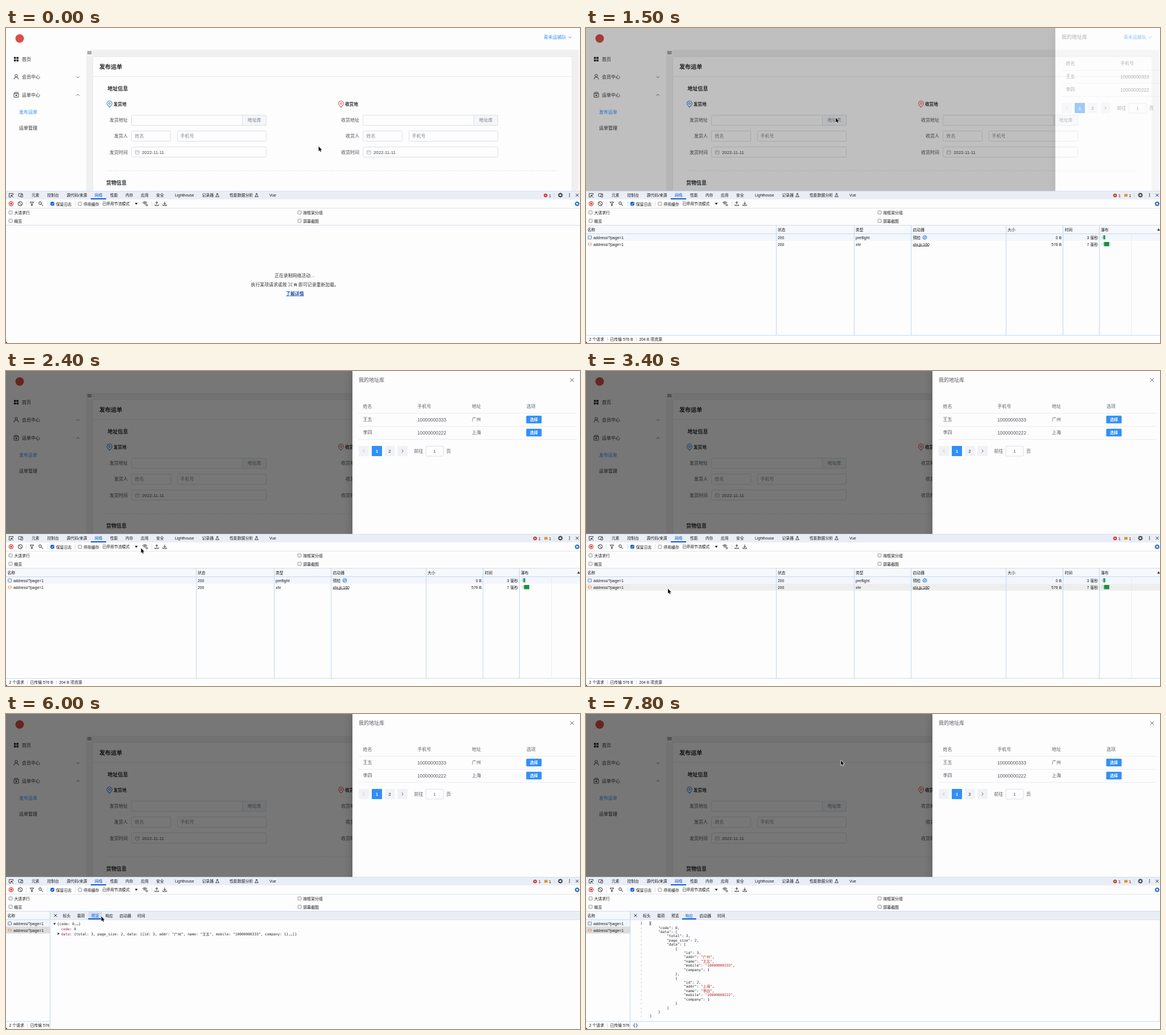
Animation of 1009 by 555 pixels, one loop 8 s. Source, as an HTML page with a canvas:

```html
<!DOCTYPE html>
<html lang="zh-CN">
<head>
<meta charset="utf-8">
<title>发布运单</title>
<style>
html, body { margin: 0; width: 100%; height: 100%; overflow: hidden; background: #fdfdfd; }
canvas { display: block; width: 1009px; height: 555px; }
</style>
</head>
<body>
<canvas id="stage" width="1009" height="555"></canvas>
<script>
const W = 1009, H = 555, PAGE_H = 287, LOOP = 8000, STEP = 100;
const SANS = '"Liberation Sans", "Noto Sans CJK SC", "Noto Sans CJK", sans-serif';
const MONO = '"DejaVu Sans Mono", "Noto Sans CJK SC", "Noto Sans CJK", monospace';
const PAPER = '#fdfdfd', INK = '#2b2c2e', DEV = '#1a1a1a', BLUE = '#0b57d0', LINK = '#2f8fff', GRID = '#bfd6f8';
const SMALL = 6.85, CODE = 6.23;
const PHONES = ['10000000333', '10000000222'];

const stage = document.getElementById('stage').getContext('2d');
const layer = Object.assign(document.createElement('canvas'), { width: W, height: H }).getContext('2d');
let g = stage;

// ---- drawing helpers ----
function text(s, x, y, size, color = INK, opt = {}) {
  g.font = `${opt.weight || 400} ${size}px ${opt.font || SANS}`;
  g.textAlign = opt.align || 'left';
  g.fillStyle = color;
  g.fillText(s, x, y + size * 0.37);
}
const dev = (s, x, y, color = DEV, opt) => text(s, x, y, SMALL, color, opt);
const bold = (s, x, y, size, color = INK) => text(s, x, y, size, color, { weight: 700 });

function rect(x, y, w, h, color) {
  g.fillStyle = color;
  g.fillRect(x, y, w, h);
}
function box(x, y, w, h, r, fill, stroke, width = 1) {
  g.beginPath();
  g.roundRect(x, y, w, h, r);
  if (fill) { g.fillStyle = fill; g.fill(); }
  if (stroke) { g.strokeStyle = stroke; g.lineWidth = width; g.stroke(); }
}
function line(points, color, width = 1, dash = []) {
  g.beginPath();
  for (let i = 0; i < points.length; i += 2) g.lineTo(points[i], points[i + 1]);
  g.setLineDash(dash);
  g.strokeStyle = color;
  g.lineWidth = width;
  g.stroke();
  g.setLineDash([]);
}
function shape(points, color) {
  g.beginPath();
  for (let i = 0; i < points.length; i += 2) g.lineTo(points[i], points[i + 1]);
  g.fillStyle = color;
  g.fill();
}
function circle(x, y, r, fill, stroke, width = 1, a = 0, b = Math.PI * 2) {
  g.beginPath();
  g.arc(x, y, r, a, b);
  if (fill) { g.fillStyle = fill; g.fill(); }
  if (stroke) { g.strokeStyle = stroke; g.lineWidth = width; g.stroke(); }
}
const chevron = (x, y, w, h, color) => line([x - w, y - h, x, y + h, x + w, y - h], color, 0.9);
const sideways = (x, y, d, color) => line([x - d, y - 2.6, x + d, y, x - d, y + 2.6], color, 0.9);
function cross(x, y, d, color, width) {
  line([x - d, y - d, x + d, y + d], color, width);
  line([x + d, y - d, x - d, y + d], color, width);
}

// ---- web page ----
function pin(x, y, color) {
  g.beginPath();
  g.arc(x, y - 1, 4.4, Math.PI * 0.85, Math.PI * 0.15);
  g.lineTo(x, y + 5.6);
  g.closePath();
  g.strokeStyle = color;
  g.lineWidth = 1.1;
  g.stroke();
  circle(x, y - 1, 1.6, null, color, 1);
}

function addressForm(dx, kind, color) {
  const edge = '#dcdfe6', hint = '#85888e', x = 220.5 + dx;
  pin(182 + dx, 134, color);
  bold(kind + '货地', 189 + dx, 134.5, 7.6);
  [['货地址', 162.5], ['货人', 190.5], ['货时间', 219]].forEach(([s, y]) =>
    text(kind + s, 214 + dx, y, 8, '#4d5055', { align: 'right' }));
  box(x, 153.5, 237, 18, 2, PAPER, edge);
  box(415.5 + dx, 153.5, 42, 18, [0, 2, 2, 0], '#f4f6f9', edge);
  text('地址库', 436.5 + dx, 162.5, 8, '#7b7e84', { align: 'center' });
  box(x, 181.5, 69, 18, 2, PAPER, edge);
  box(301.5 + dx, 181.5, 156, 18, 2, PAPER, edge);
  text('姓名', 226.5 + dx, 190.5, 8, hint);
  text('手机号', 306.5 + dx, 190.5, 8, hint);
  box(x, 209.5, 237, 18, 2, PAPER, edge);
  box(227.5 + dx, 216, 6.5, 6, 0.5, null, '#a3a6ad', 0.8);
  line([227.5 + dx, 218.3, 234 + dx, 218.3], '#a3a6ad', 0.8);
  text('2022-11-11', 239 + dx, 219, 7.8, '#434548');
}

function drawPage() {
  rect(0, 0, W, PAGE_H, PAPER);
  circle(24, 18.5, 7.5, '#dc4d45');
  text('青禾运输队', 945, 16.5, 8, LINK);
  chevron(991.5, 16.5, 2.5, 1.3, LINK);

  rect(141, 38.5, 866, 249, '#f0f0f0');
  rect(142, 39, 10, 11, '#f6f6f6');
  for (const y of [41.5, 43.5, 45.5]) line([143, y, 150.5, y], '#555', 0.9);
  for (const [x, y] of [[14, 51], [18.5, 51], [14, 55.5], [18.5, 55.5]]) rect(x, y, 3.4, 3.4, '#222');
  text('首页', 28, 55, 8);
  circle(18, 84, 2.2, null, INK, 0.9);
  circle(18, 90.5, 4, null, INK, 0.9, Math.PI, 0);
  text('会员中心', 28, 86.5, 8);
  chevron(126.5, 86.5, 2.6, 1.3, '#555');
  box(14, 115.5, 8, 6.5, 0.5, null, INK, 0.9);
  line([14, 115.5, 15.5, 113.3, 20.5, 113.3, 22, 115.5], INK, 0.9);
  rect(16.8, 117.5, 2.4, 2.4, INK);
  text('运单中心', 28, 118, 8);
  chevron(126.5, 118, 2.6, -1.3, '#555');
  text('发布运单', 23, 148, 8, LINK);
  text('运单管理', 23, 176, 8);

  box(152.5, 50.5, 842.5, 250, 2, PAPER, '#e6e8ec');
  line([153, 85.5, 995, 85.5], '#e8eaee');
  bold('发布运单', 164, 68.5, 10.1);
  bold('地址信息', 178.5, 106.5, 9);
  addressForm(0, '发', '#2f86d6');
  addressForm(407, '收', '#e05a5a');
  line([176, 251.5, 972, 251.5], '#e4e6ea', 1, [2, 2]);
  bold('货物信息', 176, 272.5, 9);
}

function drawDrawer(x) {
  const ink = '#55585e';
  g.save();
  g.shadowColor = 'rgba(0,0,0,.22)';
  g.shadowBlur = 18;
  rect(x, 0, 400, PAGE_H + 30, PAPER);
  g.restore();
  g.save();
  g.translate(x - 609, 0);
  text('我的地址库', 620, 16, 9, ink);
  cross(995, 16, 3.3, ink, 0.9);
  ['姓名', '手机号', '地址', '选项'].forEach((s, i) => text(s, 627.5 + i * 95.8, 62, 8, '#606369'));
  line([620, 74.5, 1003, 74.5], '#e9ebf0');
  [['王五', '广州'], ['李四', '上海']].forEach(([name, city], i) => {
    const y = 85.5 + i * 23;
    text(name, 627.5, y, 8, ink);
    text(PHONES[i], 723, y, 8.3, ink);
    text(city, 819, y, 8, ink);
    box(914.5, y - 6.8, 27, 13.5, 1.5, LINK);
    bold('选择', 921, y, 7, '#fff');
    line([620, y + 12, 1003, y + 12], '#e9ebf0');
  });
  for (const px of [620, 643, 665.5, 688]) box(px, 132, 18, 18, 1, px === 643 ? LINK : '#f1f2f5');
  sideways(629, 141, -1.4, '#b4b7bd');
  sideways(697, 141, 1.4, ink);
  text('1', 652, 141, 8, '#fff', { weight: 700, align: 'center' });
  text('2', 674.5, 141, 8, INK, { align: 'center' });
  text('前往', 717.5, 141.5, 8, ink);
  box(738, 132.5, 31, 17.5, 2, PAPER, '#dcdfe6');
  text('1', 753.5, 141, 8, ink, { align: 'center' });
  text('页', 774, 141.5, 8, ink);
  g.restore();
}

// ---- developer tools ----
function flask(x, y) {
  line([x - 1.2, y - 2.8, x + 1.2, y - 2.8], DEV, 0.8);
  line([x - 0.8, y - 2.8, x - 0.8, y - 0.5, x - 3, y + 2.8, x + 3, y + 2.8, x + 0.8, y - 0.5, x + 0.8, y - 2.8], DEV, 0.8);
}
function checkbox(x, y, on) {
  box(x - 2.9, y - 2.9, 5.8, 5.8, 1, on ? BLUE : PAPER, on ? BLUE : '#777', 0.8);
  if (on) line([x - 1.7, y, x - 0.4, y + 1.4, x + 1.9, y - 1.5], '#fff', 1);
}
function gear(x, y, color) {
  for (let i = 0; i < 8; i++) {
    const a = i * Math.PI / 4, c = Math.cos(a), s = Math.sin(a);
    line([x + c * 2.6, y + s * 2.6, x + c * 4.2, y + s * 4.2], color, 1.5);
  }
  circle(x, y, 2.5, null, color, 1.3);
}
function arrow(x, y, dir) {
  line([x, y - 3, x, y + 2], DEV, 0.9);
  const tip = dir < 0 ? y - 3 : y + 2;
  line([x - 2, tip - dir * 2, x, tip, x + 2, tip - dir * 2], DEV, 0.9);
  line([x - 3.2, y + 2, x - 3.2, y + 3.8, x + 3.2, y + 3.8, x + 3.2, y + 2], DEV, 0.9);
}

function drawToolbars(t) {
  rect(0, PAGE_H, W, H - PAGE_H, PAPER);
  rect(0, PAGE_H, W, 15, '#e9eef6');
  line([0, 287.5, W, 287.5], '#d5dce8', 0.8);
  line([9, 298, 5.5, 298, 5.5, 291.5, 12.5, 291.5, 12.5, 294], DEV, 0.8);
  line([13, 298.5, 8.8, 294.5, 8.8, 297.5], DEV, 0.9);
  line([8.8, 294.5, 11.8, 294.5], DEV, 0.9);
  box(22, 291.8, 7, 5, 0.5, null, DEV, 0.8);
  box(26.3, 293.5, 3, 4.5, 0.5, '#e9eef6', DEV, 0.8);
  [['元素', 45], ['控制台', 72.5], ['源代码/来源', 106.5], ['性能', 183], ['内存', 210], ['应用', 237],
   ['安全', 264], ['Lighthouse', 297], ['记录器', 344.5], ['性能数据分析', 393], ['Vue', 463]]
    .forEach(([s, x]) => dev(s, x, 294.5));
  dev('网络', 156, 294.5, BLUE, { weight: 500 });
  rect(149, 300, 27, 2, BLUE);
  flask(371.5, 294.5);
  flask(440.5, 294.5);

  const warned = t >= 1500, ex = warned ? 930 : 948.5;
  circle(ex, 295, 3.2, '#d93025');
  cross(ex, 295, 1.2, '#fff', 0.8);
  dev('1', ex + 6, 295);
  if (warned) {
    box(946.3, 292.4, 5.6, 4.5, 0.7, '#ee8c1c');
    shape([947, 296, 949.4, 296, 947, 298.3], '#ee8c1c');
    dev('1', 954.5, 295);
  }
  line([963.5, 291, 963.5, 299], '#c5cddb', 0.8);
  gear(974.5, 294.5, '#333');
  for (const y of [292, 294.5, 297]) circle(990.5, y, 0.8, DEV);
  cross(1004, 294.5, 2.5, DEV, 0.9);

  circle(9, 309.5, 3.6, null, '#d93025', 1.1);
  rect(7.4, 307.9, 3.2, 3.2, '#d93025');
  circle(25, 309.5, 3.7, null, DEV, 0.9);
  line([22.5, 307, 27.5, 312], DEV, 0.9);
  line([35.5, 305, 35.5, 314], '#cfd6e2', 0.8);
  line([42.3, 306.7, 48.7, 306.7, 46.2, 309.8, 46.2, 313, 44.8, 313, 44.8, 309.8, 42.3, 306.7], DEV, 0.9);
  circle(60, 308.5, 2.3, null, DEV, 0.9);
  line([61.7, 310.2, 65, 313.3], DEV, 1);
  line([73.5, 305, 73.5, 314], '#cfd6e2', 0.8);
  checkbox(81.5, 309.7, true);
  dev('保留日志', 88, 310);
  line([121.5, 305, 121.5, 314], '#cfd6e2', 0.8);
  checkbox(130, 309.7);
  dev('停用缓存', 136.5, 310);
  dev('已停用节流模式', 169.5, 309.7);
  shape([226.5, 308, 231.5, 308, 229, 311.5], DEV);
  for (const r of [2.2, 4, 5.8]) circle(244, 312, r, null, DEV, 0.9, Math.PI * 1.25, Math.PI * 1.75);
  circle(247.5, 312, 1.5, null, DEV, 0.8);
  line([256.5, 305, 256.5, 314], '#cfd6e2', 0.8);
  arrow(265, 309, -1);
  arrow(279, 309, 1);
  gear(1004, 309.7, BLUE);
  line([0, 317.5, W, 317.5], '#dde3ec', 0.9);
  [['大请求行', 8, 325], ['概览', 8, 339.7], ['按框架分组', 516, 325], ['屏幕截图', 516, 339.7]].forEach(([s, x, y]) => {
    checkbox(x, y);
    dev(s, x + 6.5, y + 0.3);
  });
  line([0, 347.5, W, 347.5], '#cfd8e6', 0.9);
}

function drawEmpty() {
  const c = '#333';
  text('正在录制网络活动…', 472, 436.5, 7.9, c);
  text('执行某项请求或按', 430.5, 452, 7.9, c);
  bold('⌘ R', 496, 452, 7.9, c);
  text('即可记录重新加载。', 514, 452, 7.9, c);
  bold('了解详情', 492, 468, 7.9, '#1a4fa8');
  line([492, 472, 523.5, 472], '#1a4fa8', 0.8);
}

function requestIcons(done) {
  box(3.7, 366.2, 5.8, 5.6, 0.8, null, '#5c6f8c', 0.9);
  if (!done) return;
  circle(6.7, 381, 3, null, '#f0a060', 0.6);
  line([5.6, 379.3, 4, 381, 5.6, 382.7], '#e8710a', 0.9);
  line([7.8, 379.3, 9.4, 381, 7.8, 382.7], '#e8710a', 0.9);
}

function status(done) {
  const y = 548.7, sep = '#c4ccd8';
  line([0, 541.5, W, 541.5], GRID, 0.9);
  dev('2 个请求', 5.5, y);
  line([37.5, 545, 37.5, 552.5], sep, 0.8);
  dev(done ? '已传输 576 B' : '已传输 0 B', 42.5, y);
  const x = done ? 88.5 : 80.5;
  line([x, 545, x, 552.5], sep, 0.8);
  dev(done ? '204 B 项资源' : '0 B 项资源', x + 5, y);
}

function drawTable(done, pointer) {
  rect(0, 348, W, 14.5, '#f6f8fc');
  rect(0, 362.5, W, 12.3, '#f2f7fd');
  if (pointer.y > 375 && pointer.y < 387) rect(0, 374.8, W, 12.3, '#eeeeee');
  line([0, 362.5, W, 362.5], GRID, 0.9);
  for (const x of [334.5, 471.5, 571.5, 738.5, 838.5, 902.5]) line([x, 348, x, 541], GRID, 1);
  line([959, 362, 959, 541], '#e2e6ec', 0.8);
  [['名称', 2.5], ['状态', 337], ['类型', 474], ['启动器', 574.5], ['大小', 741], ['时间', 841.5], ['瀑布', 905]]
    .forEach(([s, x]) => dev(s, x, 355));
  shape([1004, 357, 1009, 357, 1006.5, 353], '#333');
  const right = { align: 'right' };
  [['200', 'preflight', '预检', '0 B', '3 毫秒'],
   done ? ['200', 'xhr', 'xhr.js:160', '576 B', '7 毫秒'] : ['（待处理）', 'xhr', 'xhr.js:160', '0 B', '待处理']]
    .forEach(([code, type, by, size, time], i) => {
      const y = 369 + i * 12.3;
      dev('address/?page=1', 13, y);
      dev(code, 337, y);
      dev(type, 474, y);
      dev(by, 574.5, y);
      dev(size, 836, y, DEV, right);
      dev(time, 900, y, DEV, right);
    });
  line([574.5, 384.3, 603, 384.3], DEV, 0.7);
  requestIcons(done);
  rect(906, 367.5, 2.5, 2.5, '#d7dbe0');
  rect(908.5, 365.2, 2, 7.2, '#6bbf83');
  rect(910.3, 365.2, 2.4, 7.2, '#12943c');
  if (done) {
    circle(595.5, 369, 3.4, null, '#1a73e8', 0.9);
    line([593.4, 368, 597.6, 368, 596.2, 366.7], '#1a73e8', 0.8);
    line([597.6, 370, 593.4, 370, 594.8, 371.4], '#1a73e8', 0.8);
    box(906.2, 378.9, 2.5, 3.6, 0, null, '#c4c8ce', 0.6);
    rect(909.3, 377, 1.5, 7.5, '#b9dcc3');
    rect(910.8, 377, 9, 7.5, '#12943c');
  } else {
    rect(906, 378.8, 2.4, 3.6, '#8b8f95');
  }
  status(done);
}

// Draws code, colouring strings and numbers; wide glyphs take their own width.
function codeLine(s, x, y, keyed) {
  for (const part of s.match(/"[^"]*":?|\d+|[^"\d]+/g)) {
    const key = part.endsWith('":');
    const color = keyed && !key ? (part[0] === '"' ? '#b3201c' : /\d/.test(part) ? '#1a1aa6' : '#222') : '#222';
    text(part, x, y, CODE, color, { font: MONO });
    x += g.measureText(part).width;
  }
}

function drawPreview() {
  const key = '#9a1650', mono = { font: MONO };
  shape([83, 368.2, 87.6, 368.2, 85.3, 372], '#444');
  text('{code: 0,…}', 90, 369.7, CODE, '#222', mono);
  text('code', 97, 378.3, CODE, key, mono);
  text(':', 112, 378.3, CODE, '#222', mono);
  text('0', 119.5, 378.3, CODE, '#1a1aa6', mono);
  shape([90.6, 384.8, 94.4, 387.1, 90.6, 389.4], '#444');
  text('data', 97, 387.3, CODE, key, mono);
  codeLine(`: {total: 3, page_size: 2, data: [{id: 3, addr: "广州", name: "王五", mobile: "${PHONES[0]}", company: 1},…]}`, 112, 387.3);
}

function drawResponse() {
  const entry = (id, city, name, phone) => [[3, '{'], [4, `"id": ${id},`], [4, `"addr": "${city}",`],
    [4, `"name": "${name}",`], [4, `"mobile": "${phone}",`], [4, '"company": 1']];
  const rows = [[0, '{'], [1, '"code": 0,'], [1, '"data": {'], [2, '"total": 3,'], [2, '"page_size": 2,'],
    [2, '"data": ['], ...entry(3, '广州', '王五', PHONES[0]), [3, '},'], ...entry(2, '上海', '李四', PHONES[1]),
    [3, '}'], [2, ']'], [1, '}'], [0, '}']];
  rows.forEach(([depth, s], i) => {
    const y = 368.8 + i * 7.42;
    text(i ? '-' : '1', 97, y, CODE, '#1b6f94', { font: MONO, align: 'center' });
    codeLine(s, 112 + depth * 15, y, true);
  });
  line([112.3, 365, 112.3, 372.5], '#222', 0.7);
  line([78, 541.5, W, 541.5], GRID, 0.9);
  text('{}', 87, 548.3, 7.5, BLUE, { font: MONO, weight: 700, align: 'center' });
  line([1007.5, 362, 1007.5, 541], '#dfe7f2', 0.8);
}

function drawDetails(tab, pointer) {
  g.save();
  g.beginPath();
  g.rect(0, 348, 77, 207);
  g.clip();
  rect(0, 348, 77, 14.5, '#f6f8fc');
  rect(0, 362.5, 77, 12, '#f2f7fd');
  rect(0, 374.5, 77, 12.2, '#dcdcdc');
  line([0, 362.5, 77, 362.5], GRID, 0.9);
  dev('名称', 2.5, 355);
  dev('address/?page=1', 13, 369);
  dev('address/?page=1', 13, 381);
  requestIcons(true);
  status(true);
  g.restore();

  rect(78, 348, W - 78, 14, '#e9eef6');
  cross(87, 355, 2.5, DEV, 0.9);
  [['标头', 100], ['载荷', 125], ['预览', 150], ['响应', 174.5], ['启动器', 199.5], ['时间', 231]].forEach(([s, x]) => {
    const w = s.length * SMALL, on = s === tab;
    const over = pointer.y > 348 && pointer.y < 362 && pointer.x > x - 5 && pointer.x < x + w + 5;
    if (over) rect(x - 5.5, 348, w + 11, 14, '#d3dff2');
    dev(s, x, 355, on ? BLUE : DEV, { weight: on ? 500 : 400 });
    if (on) rect(x - 5.5, 360, w + 11, 2, BLUE);
  });
  line([78, 362.5, W, 362.5], '#d3deee', 0.8);
  line([77.5, 348, 77.5, H], GRID, 1);
  if (tab === '预览') drawPreview();
  else drawResponse();
}

// ---- motion ----
function ease(x) {
  if (x <= 0) return 0;
  if (x >= 1) return 1;
  const at = (a, b, u) => 3 * a * u * (1 - u) ** 2 + 3 * b * u * u * (1 - u) + u ** 3;
  let lo = 0, hi = 1;
  for (let i = 0; i < 24; i++) {
    const mid = (lo + hi) / 2;
    if (at(0.25, 0.25, mid) < x) lo = mid;
    else hi = mid;
  }
  return at(0.1, 1, lo);
}

const PATH = [
  [0, 549.5, 208.5], [200, 549.5, 208.5], [1000, 439, 158], [1900, 439, 158], [2700, 144, 383.5],
  [4700, 144, 383.5], [5500, 158, 354], [5800, 158, 354], [6000, 167.5, 356.5], [6400, 181, 356],
  [6800, 184, 357], [7200, 440, 234], [7500, 512, 150], [7800, 448, 81.5], [8000, 448, 81.5]
];
function pointerAt(t) {
  const i = Math.max(1, PATH.findIndex(p => p[0] >= t));
  const [t0, x0, y0] = PATH[i - 1], [t1, x1, y1] = PATH[i];
  const u = (t - t0) / (t1 - t0), e = u * u * (3 - 2 * u);
  return { x: x0 + (x1 - x0) * e, y: y0 + (y1 - y0) * e };
}
function drawPointer({ x, y }) {
  const pts = [0, 0, 0, 8.4, 1.9, 6.7, 3.2, 9.6, 4.6, 9, 3.4, 6.2, 5.9, 6.2, 0, 0].map((v, i) => v + (i % 2 ? y : x));
  g.lineJoin = 'round';
  line(pts, '#fff', 1.4);
  shape(pts, '#111');
  g.lineJoin = 'miter';
}

function render(t) {
  const pointer = pointerAt(t);
  drawPage();
  const p = ease((t - 1418) / 300);
  if (p > 0) {
    g = layer;
    g.clearRect(0, 0, W, H);
    rect(0, 0, W, PAGE_H, 'rgba(0,0,0,.53)');
    drawDrawer(Math.round(W - 400 * p));
    g = stage;
    g.globalAlpha = p;
    g.drawImage(layer.canvas, 0, 0);
    g.globalAlpha = 1;
  }
  drawToolbars(t);
  if (t < 1400) drawEmpty();
  else if (t < 3700) drawTable(t >= 1500, pointer);
  else drawDetails(t >= 5700 && t < 6600 ? '预览' : '响应', pointer);
  shape([0, 551.5, 0.8, 554, 3, 555, 0, 555], '#111');
  drawPointer(pointer);
}

const start = performance.now();
let shown = -1;
function tick() {
  const t = Math.floor(((performance.now() - start) % LOOP) / STEP) * STEP;
  if (t !== shown) render(shown = t);
  requestAnimationFrame(tick);
}
tick();
</script>
</body>
</html>
```
